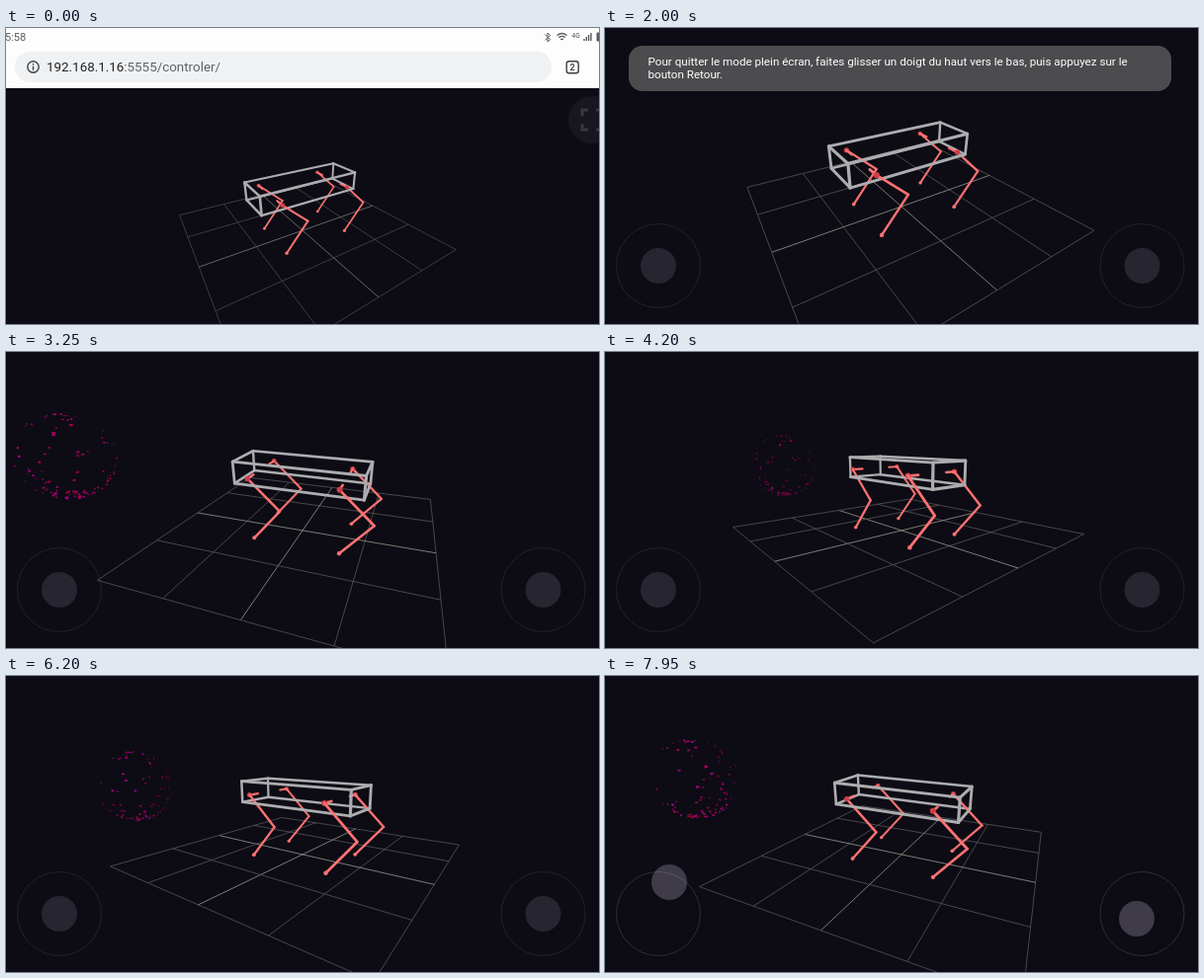
An HTML page with a canvas for the animation above (8 s loop, 600x300 px).

```html
<!DOCTYPE html>
<html lang="fr">
<head>
<meta charset="utf-8">
<style>
  html, body { margin: 0; width: 100%; height: 100%; overflow: hidden; background: #0d0c14; }
  #stage { position: relative; width: 600px; height: 300px; overflow: hidden; font-family: Roboto, sans-serif; }
  canvas { position: absolute; left: 0; top: 0; }
  #bar { position: absolute; left: 0; top: 0; width: 600px; height: 61px; background: #fdfdfe; }
  #bar svg { position: absolute; left: 0; top: 0; }
  #pill { position: absolute; left: 9px; top: 24px; width: 543px; height: 31px; border-radius: 16px; background: #eff1f2; }
  #bar span { position: absolute; white-space: pre; }
  #clock { left: -1px; top: 3px; font-size: 11px; line-height: 14px; color: #5c5c5f; }
  #url { left: 41px; top: 32px; font-size: 13.4px; line-height: 16px; color: #5f6368; }
  #url b { font-weight: 400; color: #202124; }
  #toast { position: absolute; left: 24px; top: 18px; width: 529px; height: 36px; padding: 10px 0 0 19.5px;
    border-radius: 14px; background: #4c4b4e; color: #fff; font-size: 11.65px; line-height: 13.4px; white-space: pre; }
</style>
</head>
<body>
<div id="stage">
  <canvas id="view" width="600" height="300"></canvas>
  <div id="bar">
    <div id="pill"></div>
    <span id="clock">5:58</span>
    <span id="url"><b>192.168.1.16</b>:5555/controler/</span>
    <svg width="600" height="61" fill="none" stroke="#5c5c5f">
      <g stroke="#3c4043" stroke-width="1.4">
        <circle cx="27.500" cy="39.500" r="5.700"/>
        <path d="M27.500 38.700v4M27.500 35.900v1.500"/>
        <rect x="567.200" y="33.700" width="12" height="12" rx="2.500"/>
      </g>
      <path d="M545.500 6.500l5 5-2.500 2.500v-9l2.500 2.500-5 5"/>
      <path d="M557.500 7.500q5-4 10 0M559.300 9.600q3.200-2.400 6.400 0M561.200 11.700q1.300-1 2.600 0" stroke-width="1.400"/>
      <path d="M585 13v-2M587.300 13v-4M589.600 13v-6M591.900 13v-8" stroke-width="1.400"/>
      <path d="M598 5h2v8h-2z" fill="#5c5c5f"/>
      <g fill="#4a4a4d" stroke="none" font-family="Roboto, sans-serif">
        <text x="572.500" y="9.500" font-size="6.500">4G</text>
        <text x="573.200" y="43" font-size="9" font-weight="700" text-anchor="middle">2</text>
      </g>
    </svg>
  </div>
  <div id="toast">Pour quitter le mode plein écran, faites glisser un doigt du haut vers le bas, puis appuyez sur le
bouton Retour.</div>
</div>
<script>
const LOOP = 8000, FOCAL = 309, DIST = 2.46, LIFT = 0.246;
const ctx = document.getElementById('view').getContext('2d');
const bar = document.getElementById('bar');
const toast = document.getElementById('toast');

// Each track holds [time, value] pairs.
const YAW = [[2400, 32.4], [3250, -18.8], [3950, -47.5], [4200, -49], [4850, -78], [5200, -85.7],
  [5700, -66], [6200, -34.5], [6600, -27.5], [7000, -25.2]];
const PITCH = [[2400, 28], [3250, 23.8], [3950, 11], [4200, 10.5], [4850, 16], [5200, 19.2],
  [5700, 15], [6200, 13.6], [6600, 17], [7000, 20.5]];
const LEFT_X = [[6700, 0], [7000, -21], [7450, -14], [7700, 0], [7950, 11]];
const LEFT_Y = [[6700, 0], [7000, 5], [7450, 18], [7700, -24], [7950, -32]];
const RIGHT_X = [[7500, 0], [7900, -5.5]];
const RIGHT_Y = [[7500, 0], [7900, 5]];

const clamp01 = v => Math.max(0, Math.min(1, v));
const ramp = (t, a, b) => clamp01((t - a) / (b - a));
const ease = u => u * u * (3 - 2 * u);

// Monotone cubic interpolation.
function track(keys, t) {
  const last = keys.length - 1;
  if (t <= keys[0][0]) return keys[0][1];
  if (t >= keys[last][0]) return keys[last][1];
  const i = keys.findIndex(k => k[0] > t) - 1;
  const slope = j => (keys[j + 1][1] - keys[j][1]) / (keys[j + 1][0] - keys[j][0]);
  const tangent = j => {
    if (j === 0 || j === last) return 0;
    const a = slope(j - 1), b = slope(j);
    return a * b <= 0 ? 0 : 2 * a * b / (a + b);
  };
  const h = keys[i + 1][0] - keys[i][0], u = (t - keys[i][0]) / h, e = ease(u);
  return keys[i][1] * (1 - e) + keys[i + 1][1] * e
    + h * u * (1 - u) * ((1 - u) * tangent(i) - u * tangent(i + 1));
}

// Projects body coordinates: a = along the robot, b = sideways, y = height.
function makeCamera(t) {
  const rad = Math.PI / 180, yaw = track(YAW, t) * rad, pitch = track(PITCH, t) * rad;
  const sy = Math.sin(yaw), cy = Math.cos(yaw), sp = Math.sin(pitch), cp = Math.cos(pitch);
  return ([a, b, y]) => {
    const x = b * sy - a * cy, w = a * sy + b * cy;
    const depth = DIST - w * cp - y * sp;
    return { x: 300 + FOCAL * x / depth, y: 150 + FOCAL * (LIFT - y * cp + w * sp) / depth, depth };
  };
}

function line(p, q, color, width) {
  ctx.strokeStyle = color;
  ctx.lineWidth = width;
  ctx.beginPath();
  ctx.moveTo(p.x, p.y);
  ctx.lineTo(q.x, q.y);
  ctx.stroke();
}

function disc(x, y, r, color) {
  ctx.fillStyle = color;
  ctx.beginPath();
  ctx.arc(x, y, r, 0, 7);
  ctx.fill();
}

function drawGrid(cam) {
  for (let i = -2; i <= 2; i++) {
    const s = i / 2, color = i ? '#57565a' : '#98978f';
    line(cam([s, -1, 0]), cam([s, 1, 0]), color, 0.8);
    line(cam([-1, s, 0]), cam([1, s, 0]), color, 0.8);
  }
}

let seed = 7;
const random = () => (seed = seed * 16807 % 2147483647) / 2147483647;
const sparks = Array.from({ length: 105 }, () => ({
  lat: random() * Math.PI, lon: random() * 2 * Math.PI, hue: 308 + random() * 36, size: 0.6 + random() * 0.7
}));

function drawSphere(cam, t) {
  const R = 0.41, spin = t * 0.0003;
  for (const { lat, lon, hue, size } of sparks) {
    const at = turn => {
      const r = R * Math.sin(lat), n = lon + spin + turn;
      return cam([2.43 + r * Math.cos(n), 0.01 + r * Math.sin(n), 0.39 + R * Math.cos(lat)]);
    };
    const step = 0.012 * size / Math.max(0.12, Math.sin(lat)) / R;
    const p = at(-step), q = at(step);
    line(p, q, `hsl(${hue} 95% ${32 + 5 * (3 - p.depth)}%)`, 5 * size / p.depth);
  }
}

function drawRobot(cam) {
  const parts = [];
  const bone = (m, n, color, size) => {
    const p = cam(m), q = cam(n);
    const depth = (p.depth + q.depth) / 2;
    parts.push({ depth, draw: () => line(p, q, color, FOCAL * size / depth) });
  };
  const ball = (m, size, color) => {
    const p = cam(m);
    parts.push({ depth: p.depth - 0.01, draw: () => disc(p.x, p.y, FOCAL * size / p.depth, color) });
  };
  const L = 0.485, W = 0.162, LOW = 0.405, TOP = 0.574, GRAY = '#adadb0', RED = '#fb7272';
  const BEAM = 0.02, LIMB = 0.0175;
  for (const i of [-1, 1]) {
    for (const j of [-1, 1]) {
      bone([i * L, j * W, LOW], [i * L, j * W, TOP], GRAY, BEAM);
      const y = j < 0 ? LOW : TOP;
      bone([-L, i * W, y], [L, i * W, y], GRAY, BEAM);
      bone([i * L, -W, y], [i * L, W, y], GRAY, BEAM);

      const a = i * 0.332, b = j * 0.233;
      const hip = [a, b, 0.484], knee = [a - 0.24, b, 0.263], foot = [a - 0.02, b, 0.003];
      bone([a, j * 0.14, 0.484], hip, RED, LIMB);
      bone(hip, knee, RED, LIMB);
      bone(knee, foot, RED, LIMB);
      ball(hip, 0.019, '#cf3f48');
      ball(foot, 0.015, RED);
    }
  }
  parts.sort((p, q) => q.depth - p.depth).forEach(p => p.draw());
}

const tint = alpha => `rgba(235,225,255,${alpha})`;

function drawStick(x, dx, dy, held) {
  ctx.strokeStyle = tint(held ? 0.15 : 0.09);
  ctx.lineWidth = 1;
  ctx.beginPath();
  ctx.arc(x, 241, 42.5, 0, 7);
  ctx.stroke();
  disc(x + dx, 241 + dy, 18, tint(held ? 0.225 : 0.115));
}

function drawButton(alpha) {
  ctx.globalAlpha = alpha;
  disc(593, 93, 24, '#18171f');
  ctx.strokeStyle = '#393840';
  ctx.lineWidth = 3;
  ctx.beginPath();
  for (const i of [-1, 1]) for (const j of [-1, 1]) {
    ctx.moveTo(593 + i * 4, 93 + j * 10);
    ctx.lineTo(593 + i * 10, 93 + j * 10);
    ctx.lineTo(593 + i * 10, 93 + j * 4);
  }
  ctx.stroke();
  ctx.globalAlpha = 1;
}

function render(t) {
  const full = ease(ramp(t, 300, 650));
  const top = 61 * (1 - full), scale = 0.797 + 0.203 * full;
  const cam = makeCamera(t);

  ctx.fillStyle = '#0d0c14';
  ctx.fillRect(0, 0, 600, 300);
  ctx.save();
  ctx.translate(300 * (1 - scale), top);
  ctx.scale(scale, scale);
  ctx.lineCap = 'butt';
  drawGrid(cam);
  if (t > 2350) drawSphere(cam, t);
  ctx.lineCap = 'round';
  drawRobot(cam);
  ctx.restore();

  if (full < 1) drawButton(1 - full);
  ctx.globalAlpha = ramp(t, 550, 950);
  drawStick(54, track(LEFT_X, t), track(LEFT_Y, t), t >= 6700);
  drawStick(543.5, track(RIGHT_X, t), track(RIGHT_Y, t), t >= 7500);
  ctx.globalAlpha = 1;

  bar.style.transform = `translateY(${-61 * full}px)`;
  toast.style.opacity = ramp(t, 650, 1000) * (1 - ramp(t, 2350, 2650));
}

const start = performance.now();
function tick() {
  render((performance.now() - start) % LOOP);
  requestAnimationFrame(tick);
}
tick();
</script>
</body>
</html>
```
